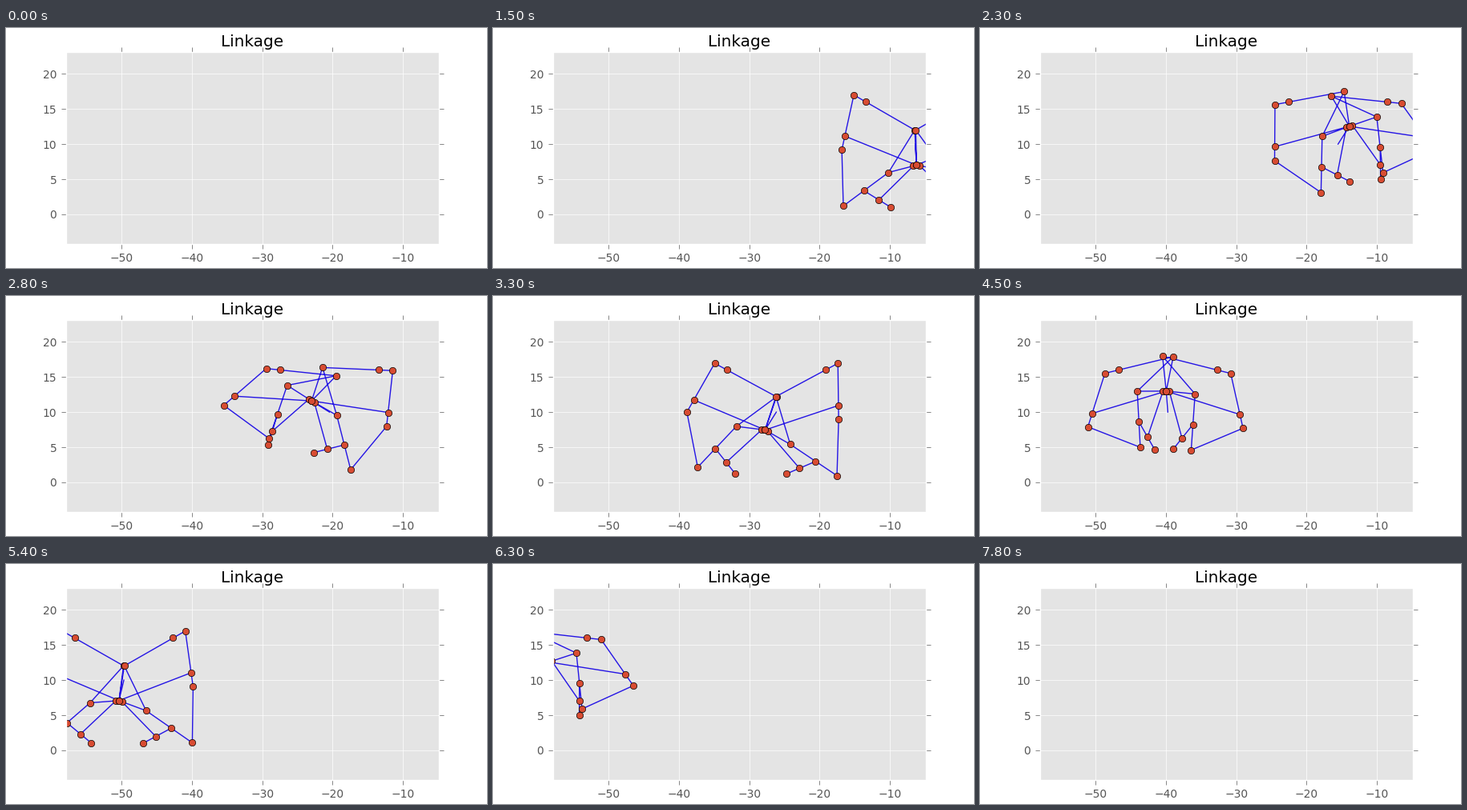
A matplotlib script that plays this animation: 600 px wide and 300 px high, repeating every 8000 ms.

```python
import numpy as np
import matplotlib.pyplot as plt
from matplotlib.animation import FuncAnimation

FRAMES, INTERVAL = 80, 100
AXLE_Y = 10
CRANK = 3
ANCHOR = np.array([-7.0, 6.0])

plt.rcParams["font.family"] = "DejaVu Sans"


def joint(p, q, rp, rq):
    """Point at distance rp from p and rq from q, left of the direction p to q."""
    d = q - p
    dist = np.hypot(*d)
    along = (rp**2 - rq**2 + dist**2) / (2 * dist)
    off = np.sqrt(max(rp**2 - along**2, 0))
    u = d / dist
    return p + along * u + off * np.array([-u[1], u[0]])


def on_bar(p, q, ratio):
    return p + (q - p) * ratio


def leg(crank_end):
    """Bars and pins of the left leg, relative to the axle."""
    a, c = ANCHOR, crank_end
    rocker = joint(a, c, 8, 5)
    shoulder = on_bar(a, rocker, -2 / 8)
    knee = joint(c, shoulder, 11, 6)
    shin = on_bar(shoulder, knee, 8 / 6)
    hip = joint(c, rocker, 4.12, 7.1)
    foot = joint(hip, shin, 8, 8)
    ankle = on_bar(hip, foot, 4.35 / 8)
    pin = on_bar(c, hip, 0.45 / 4.12)
    heel = joint(pin, ankle, 6.9, 2.5)
    toe = on_bar(ankle, heel, 4.5 / 2.5)
    bars = [
        (shoulder, a, rocker, c, hip, rocker),
        (shoulder, knee, shin, foot, ankle, hip),
        (c, knee),
        (pin, heel),
        (ankle, heel, toe),
    ]
    pins = [a, rocker, shoulder, knee, shin, hip, foot, ankle, pin, heel, toe, c]
    return bars, pins


def pose(i):
    angle = np.radians(3 + 18.03 * i)
    axle = np.array([10.33 - 1.1132 * i - 0.47 * np.cos(angle), AXLE_Y])
    crank_end = CRANK * np.array([np.cos(angle), np.sin(angle)])
    gap = [np.full(2, np.nan)]
    path = [axle, axle + crank_end] + gap
    dots = []
    for side in (1, -1):
        mirror = np.array([side, 1])
        bars, pins = leg(crank_end * mirror)
        for bar in bars:
            path += [axle + p * mirror for p in bar] + gap
        dots += [axle + p * mirror for p in pins]
    return np.array(path), np.array(dots)


fig = plt.figure(figsize=(6, 3), dpi=100, facecolor="white")
ax = fig.add_axes([0.125, 0.1, 0.775, 0.8], facecolor="#E4E4E4")
ax.set_xlim(-57.883, -4.883)
ax.set_ylim(-4.23, 23.12)
ax.set_xticks(range(-50, 0, 10))
ax.set_yticks(range(0, 25, 5))
ax.set_axisbelow(True)
ax.grid(True, color="white", linewidth=0.5, linestyle="-")
ax.tick_params(direction="out", length=4, width=0.5, pad=4, color="#555555",
               labelcolor="#555555", labelsize=10, top=True, right=True)
ax.tick_params(axis="y", pad=4.5)
for spine in ax.spines.values():
    spine.set(color="white", linewidth=1)
ax.set_title("Linkage", fontsize=14.4, pad=5, color="black")

rods, = ax.plot([], [], color="#2414E4", linewidth=1, zorder=2)
pivots, = ax.plot([], [], "o", color="#D84C32", markersize=6,
                  markeredgecolor="black", markeredgewidth=0.5, zorder=2.1)


def update(i):
    path, dots = pose(i)
    rods.set_data(path[:, 0], path[:, 1])
    pivots.set_data(dots[:, 0], dots[:, 1])
    return rods, pivots


anim = FuncAnimation(fig, update, frames=FRAMES, interval=INTERVAL,
                     repeat=True, repeat_delay=0)
plt.show()
```
